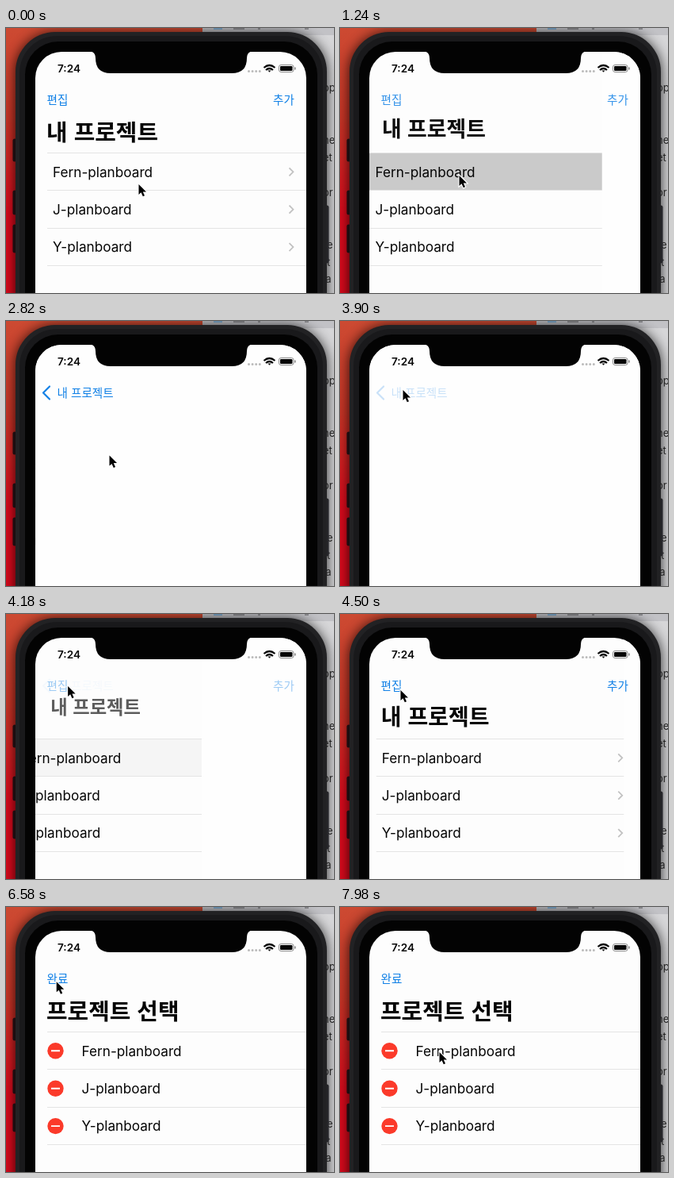
Animation, 414 px wide and 334 px high, one loop 8000 ms. Source, as an HTML page:

```html
<!DOCTYPE html>
<html lang="ko">
<head>
<meta charset="utf-8">
<style>
html, body { margin: 0; width: 100%; height: 100%; overflow: hidden; }
svg { display: block; width: 414px; height: 334px; font: 14.6px "Noto Sans CJK KR", "Noto Sans CJK", "Noto Sans", sans-serif; }
.latin { font-family: Inter, Roboto, sans-serif; }
.row { font-size: 17.2px; fill: #050505; }
.link { fill: #1080e6; }
.title { font-size: 28.9px; font-weight: 700; fill: #050505; }
.side { font-size: 13px; fill: #222; }
</style>
</head>
<body>
<svg viewBox="0 0 414 334">
  <defs>
    <linearGradient id="wall" x2="0" y2="1">
      <stop stop-color="#cc4a32"/><stop offset=".35" stop-color="#c83426"/><stop offset=".7" stop-color="#d80a1c"/>
    </linearGradient>
    <filter id="blur" x="-10%" y="-10%" width="120%" height="120%"><feGaussianBlur stdDeviation="8"/></filter>
    <clipPath id="screen"><rect x="37" y="30" width="342" height="360" rx="33"/></clipPath>
  </defs>

  <rect width="248" height="334" fill="url(#wall)"/>
  <rect x="248" width="166" height="334" fill="#d6d6d8"/>
  <rect x="248" width="166" height="9" fill="#c2c2c6"/>
  <path d="M262 1h11" stroke="#7fa9cc" stroke-width="2"/>
  <path d="M287 1h14M318 1h3M377 1h5" stroke="#8c8c90" stroke-width="2"/>
  <rect x="12" y="6" width="393" height="400" rx="50" opacity=".8" filter="url(#blur)"/>
  <g id="side" class="side latin"></g>

  <path d="M11 142v24M11 207v26M11 250v31" stroke="#1c0d10" stroke-width="5" stroke-linecap="round"/>
  <path d="M405 226v68" stroke="#26262a" stroke-width="5" stroke-linecap="round"/>
  <rect x="12" y="5" width="393" height="400" rx="50" fill="#222224"/>
  <rect x="17" y="10" width="383" height="400" rx="47" fill="#19191b"/>
  <rect x="24" y="17" width="369" height="400" rx="42" fill="#030303"/>

  <g clip-path="url(#screen)">
    <rect x="37" y="30" width="342" height="310" fill="#fdfdfd"/>
    <g id="list">
      <rect id="glow" x="37" y="158" width="342" height="46.5"/>
      <path d="M52 157.5H379M52 204.5H379M52 252.5H379M52 299.5H379" stroke="#e4e4e4"/>
      <g id="rows"></g>
    </g>
    <rect id="page" y="30" width="342" height="310" fill="#fefefe"/>
    <text id="title" class="title"></text>
    <text id="edit" class="link" x="51.5" y="95.5"></text>
    <text id="add" class="link" x="337" y="95.5">추가</text>
    <g id="back">
      <path d="M55 82.5l-8 8 8 8" fill="none" stroke="#1080e6" stroke-width="2.2" stroke-linecap="round" stroke-linejoin="round"/>
      <text class="link" x="64.5" y="95.5">내 프로젝트</text>
    </g>
    <path d="M105 29q8 1 8 9 0 19 19 19H285q19 0 19-19 0-8 8-9z" fill="#030303"/>
  </g>

  <text class="latin" x="65" y="56" font-size="13.6" font-weight="600" fill="#080808">7:24</text>
  <path d="M306.5 54.5h16" stroke="#bbb" stroke-width="3" stroke-linecap="round" stroke-dasharray="0 4.6"/>
  <g fill="none" stroke="#080808" stroke-width="2.2">
    <path d="M325.5 50q7-6 14 0M328 53q4.5-4 9 0"/>
    <path d="M330.5 53.6h4l-2 2.2z" fill="#080808" stroke="none"/>
  </g>
  <rect x="344.5" y="46.5" width="18.5" height="9" rx="2.6" fill="none" stroke="#8a8a8a"/>
  <rect x="346" y="48" width="15.5" height="6" rx="1.3" fill="#080808"/>
  <path d="M365 49.5v3" stroke="#8a8a8a" stroke-width="1.5"/>

  <path id="cursor" d="M.5 1v13l3-2.7 2.3 5 2.2-1-2.2-4.9h4.2z" stroke="#fff" stroke-width="2.2" paint-order="stroke"/>
</svg>
<script>
const $ = id => document.getElementById(id);
const set = (id, attrs) => { for (const k in attrs) $(id).setAttribute(k, attrs[k]); };
const each = (cls, fn) => document.querySelectorAll(cls).forEach(fn);
const clamp = v => Math.min(1, Math.max(0, v));
const mix = (a, b, k) => a + (b - a) * k;
const ease = v => { v = clamp(v); return v * v * (3 - 2 * v); };
// critically damped spring from 0 to 1
const spring = (ms, w) => { const x = Math.max(0, ms) * w / 1000; return 1 - (1 + x) * Math.exp(-x); };

const LOOP = 8000, SELECT = 1090, PUSH = 1148, BACK_DOWN = 3780, POP = 3908, EDIT_DOWN = 5380, EDIT = 5600;

// time, x, y of the pointer tip
const trail = [
  [0, 167, 196], [300, 167, 196], [960, 150, 185], [1240, 150, 185], [1980, 142, 188], [2500, 142, 188],
  [3650, 79, 86], [3900, 79, 86], [4500, 76, 95], [5250, 56, 83], [6300, 56, 83], [7700, 125, 182], [LOOP, 125, 182]
];

$('side').innerHTML = [['op', 76], ['ne', 142], ['et', 164], ['or', 208], ['e', 274], ['t', 296], ['la', 317]]
  .map(([s, y]) => `<text x="${s.length > 1 ? 400 : 405}" y="${y + 4}">${s}</text>`).join('');

$('rows').innerHTML = ['Fern-planboard', 'J-planboard', 'Y-planboard'].map((name, i) => `
  <g transform="translate(0 ${181.3 + i * 47.4})">
    <g class="minus"><circle cx="62.5" r="10.2" fill="#fb3a2a"/><path d="M57 0h11" stroke="#fff" stroke-width="1.9"/></g>
    <text class="row latin" x="59" y="6.3">${name}</text>
    <path class="more" d="M357.5 -5l5 5-5 5" fill="none" stroke="#c2c2c2" stroke-width="1.8"/>
  </g>`).join('');

function pointer(t) {
  const i = trail.findIndex(p => p[0] > t), a = trail[i - 1], b = trail[i];
  const k = ease((t - a[0]) / (b[0] - a[0]));
  return `translate(${mix(a[1], b[1], k)} ${mix(a[2], b[2], k)})`;
}

function draw(t) {
  const popping = t >= POP;
  const p = popping ? 1 - spring(t - POP, 7.6) : spring(t - PUSH, 7.07);
  const editing = t >= EDIT, e = ease((t - EDIT) / 600);

  set('list', { transform: `translate(${-103 * p} 0)` });
  set('glow', { opacity: t < SELECT ? 0 : popping ? p * p : 1, fill: '#cacaca' });
  set('page', { x: 379 - 342 * p });

  $('title').textContent = editing ? '프로젝트 선택' : '내 프로젝트';
  set('title', {
    transform: `translate(${mix(51, 64.5, p)} ${mix(142, 95.5, p ** 1.15)}) scale(${mix(1, .5, p)})`,
    opacity: clamp(1.15 - 1.3 * p)
  });

  const nav = clamp(1.1 - 1.8 * p);
  $('edit').textContent = editing ? '완료' : '편집';
  set('edit', { opacity: t >= EDIT_DOWN && !editing ? .22 : nav });
  set('add', { opacity: nav * (1 - e) });
  set('back', { opacity: clamp((p - .3) / .6) * (t >= BACK_DOWN ? .22 : 1) });

  each('.minus', m => {
    m.setAttribute('transform', `translate(${-36 * (1 - e)} 0)`);
    m.setAttribute('opacity', e);
  });
  each('.row', r => r.setAttribute('x', 59 + 36.5 * e));
  each('.more', m => m.setAttribute('opacity', 1 - e));
  set('cursor', { transform: pointer(t) });
}

const start = performance.now();
function tick() {
  draw((performance.now() - start) % LOOP);
  requestAnimationFrame(tick);
}
tick();
</script>
</body>
</html>
```
